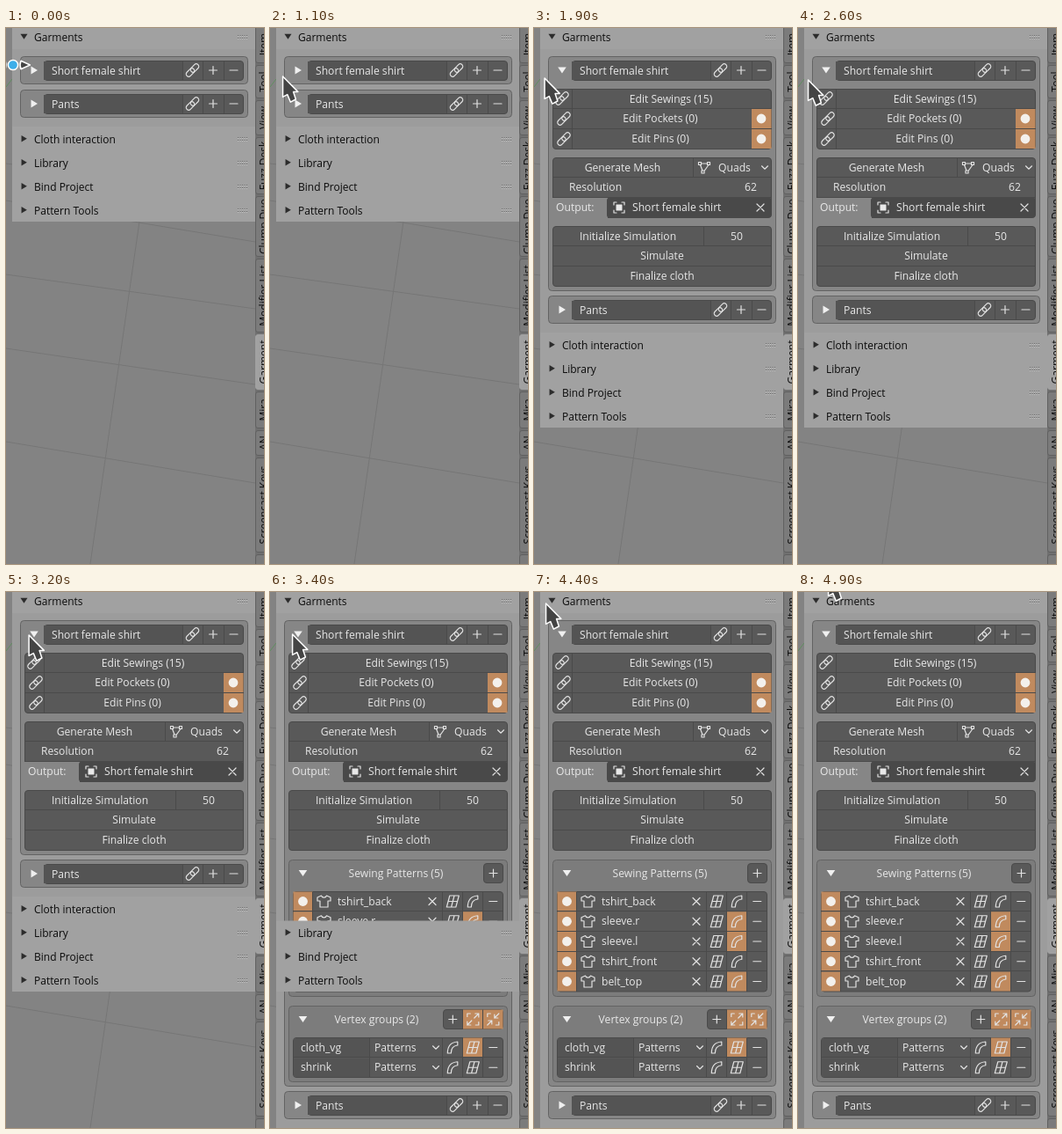
These frames come from a looping animation (294x609 px, 5300 ms). An HTML page:

```html
<!DOCTYPE html>
<html lang="en">
<head>
<meta charset="utf-8">
<title>Garment panel</title>
<style>
html, body { margin: 0; width: 100%; height: 100%; overflow: hidden; background: #838383; }
svg { display: block; width: 294px; height: 609px; }
text { font: 12.15px "Open Sans", "Noto Sans", sans-serif; fill: #e8e8e8; white-space: pre; }
.dark { font-size: 12px; fill: #0c0c0c; }
.icon { fill: none; stroke: #e2e2e2; stroke-width: 1.2; stroke-linecap: round; stroke-linejoin: round; }
</style>
</head>
<body>
<svg id="stage" viewBox="0 0 294 609" xmlns="http://www.w3.org/2000/svg"></svg>
<script>
const LOOP = 5300;
const PANEL = '#a1a1a1', BODY = '#9c9c9c', BOX = '#868686', SUB = '#7c7c7c', BUTTON = '#595959', FIELD = '#545454';
const EDGE = '#4a4a4a', ORANGE = '#c08a5e', LIGHT = '#e8e8e8';

const rect = (x, y, w, h, fill, rx = 0, stroke = 'none') =>
  `<rect x="${x}" y="${y}" width="${w}" height="${h}" rx="${rx}" fill="${fill}" stroke="${stroke}"/>`;
const line = (x1, y1, x2, y2, stroke, w = 1) =>
  `<path d="M${x1} ${y1}L${x2} ${y2}" stroke="${stroke}" stroke-width="${w}" fill="none"/>`;
// Baselines sit on whole pixels
const text = (s, x, cy, anchor = 'start', cls = '') =>
  `<text x="${x}" y="${Math.floor(cy + 4.5)}" text-anchor="${anchor}" class="${cls}">${s}</text>`;
const mid = (s, x, cy) => text(s, x, cy, 'middle');
const shape = (d, fill) => `<path d="${d}" fill="${fill}"/>`;
const icon = (d, x, y) => `<path class="icon" transform="translate(${x} ${y})" d="${d}"/>`;
const dot = (x, y) => `<circle cx="${x}" cy="${y}" r="5.4" fill="#f3f0ec"/>`;

const ICON = {
  plus: 'M-4.5 0H4.5M0 -4.5V4.5',
  minus: 'M-4.5 0H4.5',
  cross: 'M-4 -4L4 4M4 -4L-4 4',
  chevron: 'M-3.5 -1.7L0 1.7L3.5 -1.7',
  shirt: 'M-3 -6.5L-7.5 -4.5V-.5H-4.5V6.5H4.5V-.5H7.5V-4.5L3 -6.5C2 -3.6 -2 -3.6 -3 -6.5Z',
  grid: 'M-3.5 -6.5H7L3.5 6.5H-7ZM-5.2 0H5.2M1.7 -6.5L-1.7 6.5',
  curve: 'M-6 6.5C-6 -1 -2 -6 5.5 -6.5V-2.5C.5 -2 -2 1 -2 6.5Z',
  grow: 'M1.5 -1.5L6.5 -6.5M2.5 -6.5H6.5V-2.5M-1.5 1.5L-6.5 6.5M-2.5 6.5H-6.5V2.5M-6.5 -3V-6.5H-3M6.5 3V6.5H3',
  shrink: 'M6.5 -6.5L1.5 -1.5M1.5 -5.5V-1.5H5.5M-6.5 6.5L-1.5 1.5M-1.5 5.5V1.5H-5.5M-6.5 -3V-6.5H-3M6.5 3V6.5H3',
  mesh: 'M-3 -4.5H4M-4.5 -3L-2 3.5M5 -3L0 4M-6.5 -6h3v3h-3zM3.5 -6h3v3h-3zM-3 3.5h3v3h-3z'
};

// Two interlocked rings on a diagonal
const link = (x, y) => `<g class="icon" transform="translate(${x} ${y}) rotate(-45)">` +
  rect(-9, -2.9, 11, 5.8, 'none', 2.9, '#e2e2e2') + rect(-2, -2.9, 11, 5.8, 'none', 2.9, '#e2e2e2') + '</g>';
const triRight = (x, y, fill, k = 1) =>
  shape(`M${x - 3.5 * k} ${y - 4.5 * k}L${x + 4 * k} ${y}L${x - 3.5 * k} ${y + 4.5 * k}Z`, fill);
const triDown = (x, y, fill, k = 1) =>
  shape(`M${x - 4.8 * k} ${y - 3.6 * k}H${x + 4.8 * k}L${x} ${y + 3.6 * k}Z`, fill);
const box = (x, y, w, h, fill = BOX) => rect(x + .5, y + .5, w - 1, h - 1, fill, 4, '#636363');
const button = (x, y, w, h, fill = BUTTON) => rect(x + .5, y + .5, w - 1, h - 1, fill, 3.5, EDGE);
const cell = (x, y, name, on) =>
  (on ? rect(x, y - 11, 22.5, 22, ORANGE) : '') + icon(ICON[name], x + 11.3, y);

function header(label, cy, open) {
  let s = (open ? triDown : triRight)(20.5, cy - .3, '#2c2c2c', .84) + text(label, 32, cy + .5, 'start', 'dark');
  for (let i = 0; i < 5; i++)
    for (let j = 0; j < 2; j++)
      s += rect(264 + i * 2.5, cy - 2 + j * 3, 1, 1, '#6c6c6c') + rect(264 + i * 2.5, cy - 1 + j * 3, 1, 1, '#c4c4c4');
  return s;
}

function itemRow(label, cy, open) {
  let s = button(43, cy - 11, 228, 23) + rect(43, cy - 10, 158, 21, FIELD);
  for (const x of [201.5, 224.5, 248.5]) s += line(x, cy - 10, x, cy + 11, EDGE);
  return s + (open ? triDown : triRight)(32, cy, '#f0f0f0') + text(label, 52, cy + .5) +
    link(212.5, cy) + icon(ICON.plus, 236, cy) + icon(ICON.minus, 259.5, cy);
}

const pants = cy => box(16, cy - 16, 260, 32) + itemRow('Pants', cy, false);

function rowLines(y, n, x, w) {
  let s = '';
  for (let i = 1; i < n; i++) {
    const ly = Math.floor(y + i * 22.7) + .5;
    s += line(x, ly, x + w, ly, EDGE);
  }
  return s;
}

function settings() {
  let s = button(21, 69, 250, 69) + rowLines(69, 3, 21, 250) + line(43.5, 69, 43.5, 138, EDGE);
  for (const y of [80, 103, 126]) s += link(y === 80 ? 32 : 34, y);
  s += mid('Edit Sewings (15)', 156, 80.5);
  for (const [label, y] of [['Edit Pockets (0)', 102.5], ['Edit Pins (0)', 125.5]])
    s += mid(label, 144, y) + rect(248, y - 10.5, 22.5, 22, ORANGE) + dot(259, y + .5);

  s += button(21, 147, 250, 69) + rect(20, 193, 64, 24, BOX) + rect(83, 193, 187.5, 22.5, '#494949', 3) +
    rowLines(147, 3, 21, 250) + line(181.5, 148, 181.5, 169, EDGE);
  s += mid('Generate Mesh', 101, 158.5) + icon(ICON.mesh, 194, 158.5) + text('Quads', 210, 158.5) +
    icon(ICON.chevron, 263, 158.5) + text('Resolution', 40, 181) + text('62', 254, 181, 'end');
  s += text('Output:', 25, 204) + icon('M-6 -3V-6H-3M3 -6H6V-3M6 3V6H3M-3 6H-6V3', 97, 204) +
    rect(93.5, 200.5, 7, 7, LIGHT) + text('Short female shirt', 112, 204) + icon(ICON.cross, 258, 204);

  s += button(21, 225, 250, 69) + rowLines(225, 3, 21, 250) + line(193.5, 226, 193.5, 248, EDGE);
  return s + mid('Initialize Simulation', 107, 236.5) + mid('50', 231, 236.5) +
    mid('Simulate', 146, 259) + mid('Finalize cloth', 146, 281.5);
}

function patterns() {
  let s = box(21, 304, 250, 156, SUB) + triDown(37.5, 319.5, '#f0f0f0') + mid('Sewing Patterns (5)', 143.5, 319.5) +
    button(243, 308, 23, 23) + icon(ICON.plus, 254.5, 319.5) + button(26, 340, 240, 114.5);
  ['tshirt_back', 'sleeve.r', 'sleeve.l', 'tshirt_front', 'belt_top'].forEach((name, i) => {
    const y = 351.5 + i * 22.75;
    s += cell(197, y, 'grid', false) + cell(220, y, 'curve', i % 3 > 0) + cell(243, y, 'minus', false) +
      rect(26.5, y - 11, 22, 22, ORANGE) + dot(37.5, y) + icon(ICON.shirt, 61.5, y) +
      text(name, 77, y) + icon(ICON.cross, 185, y);
  });
  for (const x of [48.5, 196.5, 219.5, 242.5]) s += line(x, 341, x, 454, EDGE);
  return s + rowLines(340, 5, 26, 240);
}

function groups() {
  let s = box(21, 470, 250, 87, SUB) + triDown(37.5, 485.5, '#f0f0f0') + mid('Vertex groups (2)', 121.5, 485.5) +
    button(197, 474, 69, 23) + cell(197, 485.5, 'plus', false) + cell(220, 485.5, 'grow', true) +
    cell(243, 485.5, 'shrink', true) + button(26, 506, 240, 46);
  ['cloth_vg', 'shrink'].forEach((name, i) => {
    const y = 517.5 + i * 22.75;
    s += rect(27, y - 10.5, 86, 21, FIELD) + text(name, 35, y) + text('Patterns', 119, y) +
      icon(ICON.chevron, 189, y) + cell(197, y, 'curve', false) + cell(220, y, 'grid', i === 0) +
      cell(243, y, 'minus', false);
  });
  for (const x of [113.5, 196.5, 219.5, 242.5]) s += line(x, 507, x, 551, EDGE);
  for (const x of [219.5, 242.5]) s += line(x, 475, x, 496, EDGE);
  return s + rowLines(506, 2, 26, 240);
}

// Lower edge of the main panel in its three states
const BOTTOM = [112, 346, 609];

function garments(state) {
  const open = state > 0;
  let s = rect(7, 0, 277, 24, PANEL) + rect(7, 24, 277, BOTTOM[state] - 24, BODY) + header('Garments', 10, true) +
    box(16, 32, 260, [32, 267, 530][state]) + itemRow('Short female shirt', 48, open);
  if (open) s += settings();
  if (state === 2) s += patterns() + groups();
  return s + pants([86, 320, 583][state]);
}

function viewport() {
  let s = rect(0, 0, 294, 609, '#838383');
  for (const [a, b] of [[154, 187], [196, 243], [280, 319], [364, 405], [470, 517]]) s += line(0, a, 284, b, '#767676');
  return s + line(152, 220, 96, 609, '#767676') + line(0, 67, 7, 58, '#5f8f5f');
}

function tabs() {
  const names = ['Item', 'Tool', 'View', 'Fuzz Desk', 'Clump Duo', 'Modifier List', 'Garment', 'Mira', 'AN', 'Screencast Keys', ''];
  const edges = [-4, 41, 81, 123, 190, 261, 347, 412, 456, 487, 597, 640];
  let s = rect(284, 0, 10, 609, '#707070');
  names.forEach((name, i) => {
    const y = edges[i], h = edges[i + 1] - y, active = name === 'Garment';
    s += rect(284.5, y + 1.5, 20, h - 3, active ? PANEL : '#7b7b7b', 2.5, active ? PANEL : '#606060') +
      `<text class="dark" text-anchor="middle" transform="translate(297.8 ${y + h / 2}) rotate(-90)">${name}</text>`;
  });
  return s;
}

const ink = 'fill="#444" stroke="#fff" stroke-width="1.5" stroke-linejoin="round"';
const arrow = `<path ${ink} d="M.6 1L17.8 18.4H12.6L15.4 27L9.4 30.2L5.8 21.6L.6 24.4Z"/>`;
const head = 'M9 -4.8L19.4 0L9 4.8Q7.2 0 9 -4.8Z';
const resize = `<path ${ink} d="${head}"/><path ${ink} transform="scale(-1 1)" d="${head}"/>` +
  '<circle r="5.6" fill="#3daee9" stroke="#fff" stroke-width="1.5"/>';

const stage = document.getElementById('stage');
stage.innerHTML = viewport() +
  [0, 1, 2].map(i => `<g id="panel${i}">${garments(i)}</g>`).join('') +
  `<g id="rest"><g id="cloth">${rect(7, 0, 277, 28, PANEL)}${header('Cloth interaction', 14, false)}</g>` +
  rect(7, 27.5, 277, 80.5, PANEL) +
  ['Library', 'Bind Project', 'Pattern Tools'].map((s, i) => header(s, 41 + i * 27, false)).join('') + '</g>' +
  tabs() + `<g id="arrow">${arrow}</g><g id="resize">${resize}</g>`;
const el = id => document.getElementById(id);
const show = (id, on) => el(id).setAttribute('display', on ? 'inline' : 'none');
const move = (id, x, y) => el(id).setAttribute('transform', `translate(${x} ${y})`);

// Pointer stretches: [kind, start ms, x y pairs held 100 ms each]
const PATH = [
  ['resize', 0, [8, 42, 7, 47]],
  ['resize', 400, [8, 50, 10, 53]],
  ['arrow', 700, [11, 52, 12, 53]],
  ['arrow', 1100, [14, 54, 19, 51, 26, 47, 31, 45, 32, 45, 32, 45, 30, 46, 21, 51, 11.5, 56, 11, 58]],
  ['arrow', 2200, [10, 58.5]],
  ['arrow', 2600, [11, 58, 14, 56, 18, 53, 21, 50, 23, 49, 24, 48, 25.5, 48]],
  ['arrow', 3400, [25, 47, 22, 44, 18, 40]],
  ['resize', 3700, [11, 36, 10, 34, 10, 33, 10, 31, 9, 28, 9, 26]],
  ['arrow', 4400, [13, 12, 16, 8, 21, 2, 27, -8, 32, -16, 34, -20]]
];

function update(t) {
  const [kind, start, pts] = PATH.filter(p => p[1] <= t).pop();
  const i = Math.min(Math.floor((t - start) / 100), pts.length / 2 - 1);
  show('arrow', kind === 'arrow');
  show('resize', kind === 'resize');
  move(kind, pts[2 * i], pts[2 * i + 1]);

  const state = t >= 3400 ? 2 : t >= 1500 ? 1 : 0;
  for (let k = 0; k < 3; k++) show('panel' + k, k === state);
  // Lower panels lag behind when the list unfolds
  const since = state ? t - [0, 1500, 3400][state] : Infinity;
  const y = since < 100 ? BOTTOM[state - 1] : BOTTOM[state] - (since < 200 ? 5 : 0);
  move('rest', 0, y);
  show('cloth', since >= 100);
}

const begin = performance.now();
function tick() {
  update((performance.now() - begin) % LOOP);
  requestAnimationFrame(tick);
}
tick();
</script>
</body>
</html>
```
